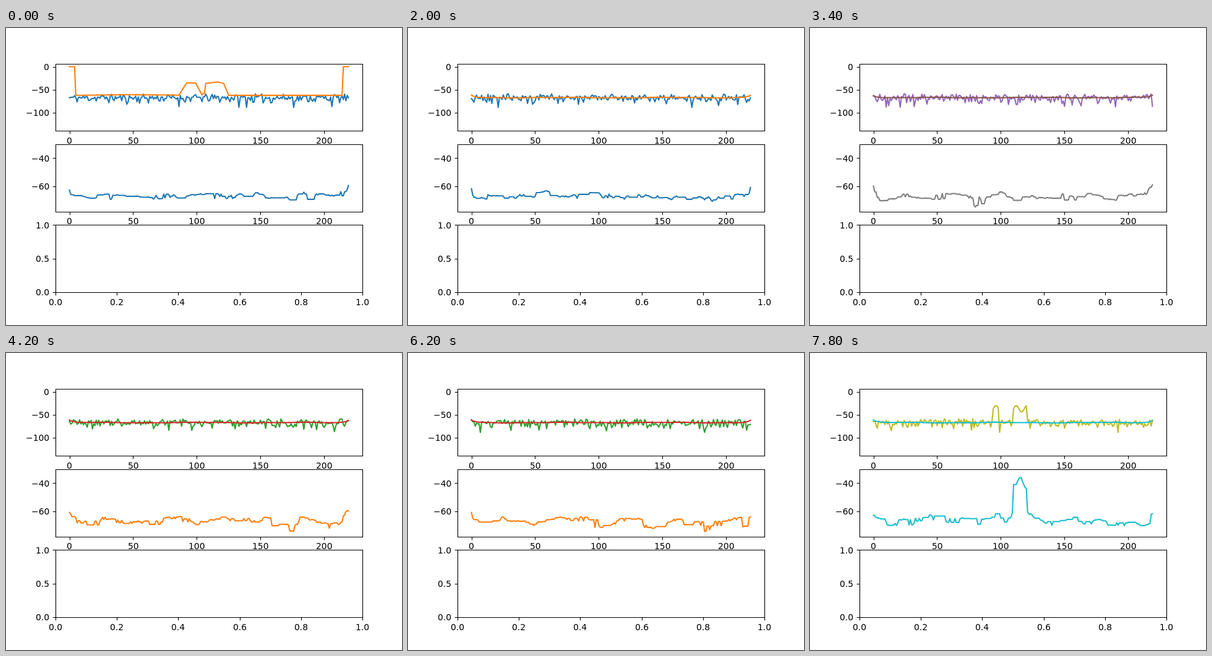
These frames come from a looping animation (640x480 px, 8000 ms). An HTML page:

```html
<!DOCTYPE html>
<html lang="en">
<head>
<meta charset="utf-8">
<title>Signal levels</title>
<style>
  html, body { margin: 0; width: 100%; height: 100%; overflow: hidden; background: #fff; }
  svg { display: block; width: 640px; height: 480px; }
  text { font: 13.889px "DejaVu Sans", sans-serif; }
  .axis { fill: none; stroke: #000; stroke-width: 1.11; }
  .line { fill: none; stroke-width: 2.083; stroke-linejoin: round; stroke-linecap: square; }
</style>
</head>
<body>
<svg id="stage" viewBox="0 0 640 480"></svg>
<script>
const COLORS = ['#1f77b4', '#ff7f0e', '#2ca02c', '#d62728', '#9467bd',
                '#8c564b', '#e377c2', '#7f7f7f', '#bcbd22', '#17becf'];
const STEP = 200, STEPS = 40, COUNT = 220, WINDOW = 11;
const LEFT = 80, RIGHT = 576, TOP = 57.6, HEIGHT = 108.706, PITCH = 130.447;

// Key points of the first slow curve: sample index and level.
const OPENING = [[0, 0], [4, 0], [5, -62], [45, -60.5], [86, -61.5], [92, -35], [99, -35], [104, -61],
                 [106, -57], [107, -36], [116, -33], [121, -36], [125, -62], [214, -62], [215, 0], [219, 0]];

const samples = fn => Array.from({ length: COUNT }, (_, i) => fn(i));

function levelAt(points, i) {
  const k = Math.max(1, points.findIndex(p => p[0] >= i));
  const [x0, y0] = points[k - 1], [x1, y1] = points[k];
  return y0 + (y1 - y0) * (i - x0) / (x1 - x0);
}

function randomFrom(seed) {
  return () => {
    seed = (seed + 0x6D2B79F5) | 0;
    let r = Math.imul(seed ^ (seed >>> 15), seed | 1);
    r ^= r + Math.imul(r ^ (r >>> 7), r | 61);
    return ((r ^ (r >>> 14)) >>> 0) / 4294967296;
  };
}

// Every twelfth step carries a pair of pulses; the last pair comes earlier.
function pulsesOf(step) {
  if (step % 12 !== 3) return [];
  return step === STEPS - 1 ? [[94, 98], [110, 120]] : [[99, 109], [121, 131]];
}

// Power of random noise in dB, lifted during pulses.
function rawSignal(step) {
  const random = randomFrom(step * 977 + 11);
  const pulses = pulsesOf(step);
  return samples(i => {
    const noise = -65.5 + 10 * Math.log10(-Math.log(1 - random()) + 1e-9);
    const pulse = pulses.find(([from, to]) => i >= from && i <= to);
    return pulse ? -37 + 7 * Math.sin((i - pulse[0]) * 0.75) : Math.max(-88, Math.min(-59, noise));
  });
}

function slowAverage(step) {
  if (step === 0) return samples(i => levelAt(OPENING, i));
  return samples(i => -66.8 + 5 * Math.exp(-i / 3) + 5 * Math.exp((i - COUNT + 1) / 3)
    + 0.5 * Math.sin(i / 13 + step * 2.1) + 0.3 * Math.sin(i / 5 + step));
}

// Running median, with zeros beyond both ends.
function medianSignal(raw) {
  const half = (WINDOW - 1) / 2;
  return samples(i => {
    const near = Array.from({ length: WINDOW }, (_, k) => raw[i + k - half] ?? 0);
    return near.sort((a, b) => a - b)[half];
  });
}

const sampleX = i => LEFT + (i + 10.95) / 240.9 * (RIGHT - LEFT);
const unitX = v => LEFT + v * (RIGHT - LEFT);
const levelY = v => 62.54 - 0.747 * v;
const medianY = v => 210.3 - 2.275 * (v + 40);
const unitY = v => TOP + 2 * PITCH + (1 - v) * HEIGHT;

const stage = document.getElementById('stage');
function add(tag, attrs, text = '') {
  const node = document.createElementNS('http://www.w3.org/2000/svg', tag);
  for (const name in attrs) node.setAttribute(name, attrs[name]);
  node.textContent = text;
  return stage.appendChild(node);
}

// Places text on whole pixels; align is 0.5 for centred, 1 for right-aligned.
function addLabel(value, digits, x, y, align) {
  const node = add('text', { y: Math.round(y) }, value.toFixed(digits).replace('-', '\u2212'));
  node.setAttribute('x', Math.round(x - align * node.getComputedTextLength()));
}

const snap = v => Math.round(v) + 0.5;

function addAxes(row, xTicks, toX, yTicks, toY, digits) {
  const top = snap(TOP + row * PITCH), base = TOP + row * PITCH + HEIGHT, bottom = snap(base);
  let d = `M80.5 ${top}H576.5V${bottom}H80.5Z`;
  for (const v of xTicks) {
    d += `M${snap(toX(v))} ${bottom}v4.86`;
    addLabel(v, digits, toX(v), base + 20.4, 0.5);
  }
  for (const v of yTicks) {
    d += `M80.5 ${snap(toY(v))}h-4.86`;
    addLabel(v, digits, 70.3, toY(v) + 5.2, 1);
  }
  add('path', { class: 'axis', d });
}

const [rawLine, slowLine, medianLine] = [0, 1, 2].map(() => add('path', { class: 'line' }));
const sampleTicks = [0, 50, 100, 150, 200];
addAxes(0, sampleTicks, sampleX, [0, -50, -100], levelY, 0);
addAxes(1, sampleTicks, sampleX, [-40, -60], medianY, 0);
addAxes(2, [0, 0.2, 0.4, 0.6, 0.8, 1], unitX, [0, 0.5, 1], unitY, 1);

function draw(line, values, toY, color) {
  const points = values.map((v, i) => sampleX(i).toFixed(2) + ' ' + toY(v).toFixed(2));
  line.setAttribute('d', 'M' + points.join('L'));
  line.setAttribute('stroke', COLORS[color % COLORS.length]);
}

let shown = -1;
function render(now) {
  const step = Math.floor(now / STEP) % STEPS;
  if (step === shown) return;
  shown = step;
  const raw = rawSignal(step);
  draw(rawLine, raw, levelY, step * 2);
  draw(slowLine, slowAverage(step), levelY, step * 2 + 1);
  draw(medianLine, medianSignal(raw), medianY, step);
}

const start = performance.now();
function tick() {
  render(performance.now() - start);
  requestAnimationFrame(tick);
}
tick();
</script>
</body>
</html>
```
